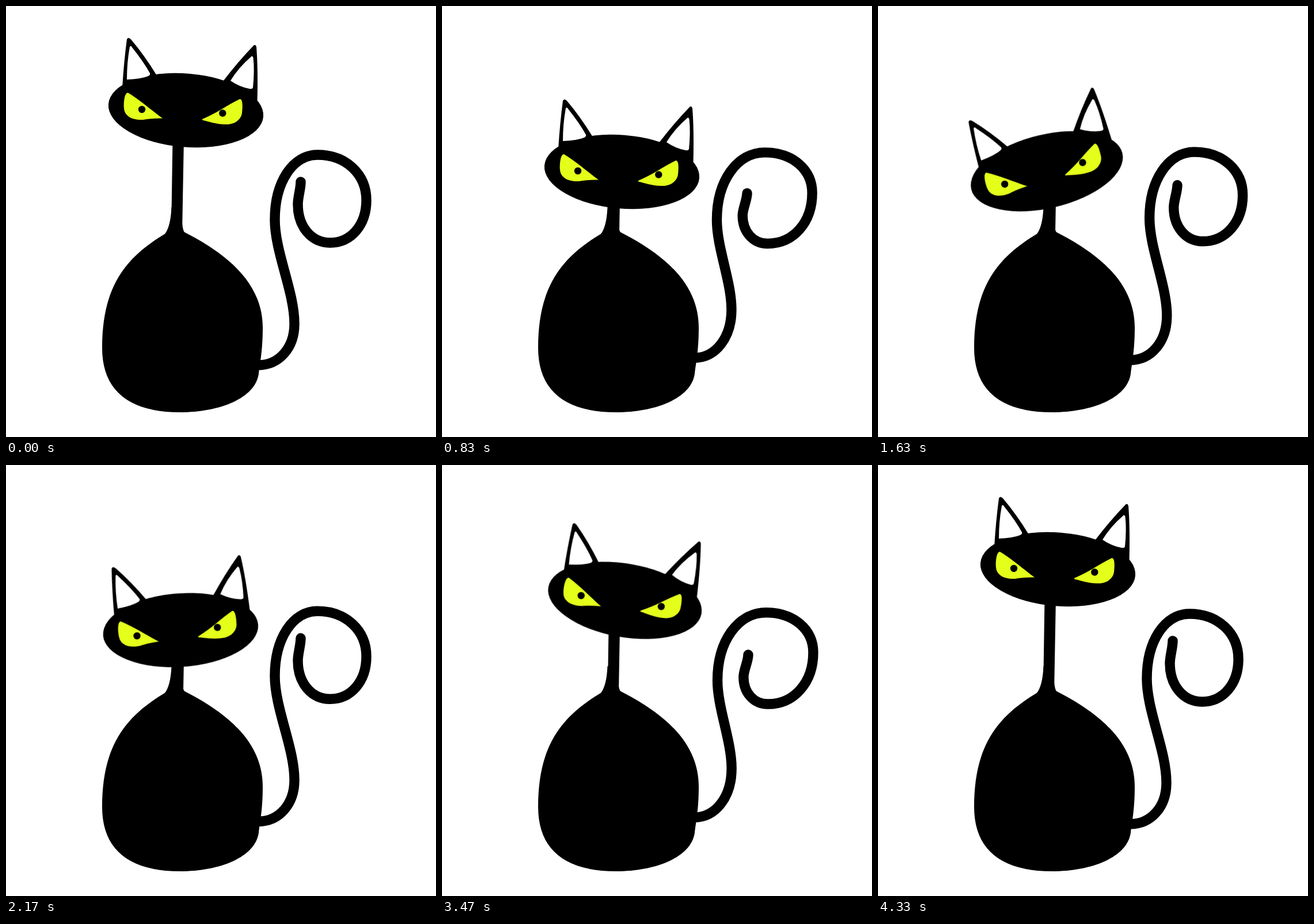
An HTML page for the animation above (4.36 s loop, 747 px wide and 750 px high).

```html
<!DOCTYPE html>
<html lang="en">
<head>
<meta charset="utf-8">
<title>Black cat</title>
<style>
  html, body { margin: 0; width: 100%; height: 100%; overflow: hidden; background: #fff; }
  svg { display: block; width: 100%; height: 100%; }

  .drop, .tilt, .lid { animation: 4360ms cubic-bezier(.333, 0, .667, 1) infinite; }
  .drop { animation-name: drop; }
  .tilt { animation-name: tilt; transform-origin: 300px 241px; }
  .lid { animation-name: squint; fill: #4b4c16; }
  .eye { fill: #e4ff1a; }
  .inner { fill: #fff; }

  @keyframes drop {
    0%, 85.9%, 100% { transform: none; }
    19.1%, 73.2% { transform: translateY(107px); }
  }
  @keyframes tilt {
    0%, 19.1%, 85.9%, 100% { transform: rotate(0deg); }
    27.5%, 42.4% { transform: rotate(-18.2deg); }
    61.5%, 73.2% { transform: rotate(10.4deg); }
  }
  @keyframes squint {
    0%, 62%, 73%, 100% { transform: translateY(-24px); }
    64.9%, 70% { transform: none; }
  }
</style>
</head>
<body>
<svg viewBox="0 0 747 750">
  <defs>
    <path id="eyeL" d="M212 151 C206 150 204 168 205 178 C206 192 220 199 238 198 Q252 195 272 195.5 C252 181 232 163 212 151 Z"/>
    <path id="eyeR" d="M406 162 C412 161 411 178 410 186 C408 200 394 207 381 206 C366 206 352 201 341 198.5 Q340 197 343 196 C365 187 385 172 406 162 Z"/>
    <clipPath id="clipL"><use href="#eyeL"/></clipPath>
    <clipPath id="clipR"><use href="#eyeR"/></clipPath>
  </defs>

  <path id="tail" fill="none" stroke="#000" stroke-width="17.4" stroke-linecap="round"/>

  <!-- body with the flared foot of the neck -->
  <path d="M277 396 C206 438 167 490 167 595 C167 668 212 707 303 707 C370 707 433 683 439 640 C441 622 446 600 446 560 C446 482 385 432 309 393 Z"/>
  <path d="M287.5 350 Q286 385 275 398 L311 395 Q304 388 306 350 Z"/>

  <g class="drop">
    <!-- the neck slides down into the body -->
    <path d="M289.5 231 L287 395 H306 L309 231 Z"/>

    <g class="tilt">
      <ellipse cx="312.5" cy="181.5" rx="135" ry="64" transform="rotate(4.7 312.5 181.5)"/>

      <path d="M210 58 Q212 53 217 58 Q240 85 262 121 L235 145 L202 142 Q205 95 210 58 Z"/>
      <path class="inner" d="M215 71 Q217 68 219 72 Q239 97 250 117 Q251 120 247 122 Q235 127 210 128 Q210 98 215 71 Z"/>
      <path d="M377 131 Q403 97 429 70 Q433 65 435 71 Q438 110 436.5 167 L400 160 Z"/>
      <path class="inner" d="M425 89 Q428 85 429.5 90 Q432 112 429 142 Q428 145 423 144 Q406 141 390 130 Q404 107 425 89 Z"/>

      <use class="eye" href="#eyeL"/>
      <use class="eye" href="#eyeR"/>
      <circle cx="236" cy="180" r="6.2"/>
      <circle cx="376.3" cy="186.5" r="6.2"/>
      <g clip-path="url(#clipL)"><path class="lid" d="M206 146 Q226 184 276 196 V120 H206 Z"/></g>
      <g clip-path="url(#clipR)"><path class="lid" d="M338 198 Q383 194 412 159 V120 H338 Z"/></g>
    </g>
  </g>
</svg>

<script>
  const LOOP = 4360, SWAY = LOOP / 2;
  const tail = document.getElementById('tail');

  // Turning points of the tail: place at rest, shift at full swing, vertical tangent?
  const turns = [
    { x: 438, y: 625, dx: 0, dy: -9, vert: false },
    { x: 501, y: 553, dx: 2, dy: -22, vert: true },
    { x: 467, y: 372, dx: 11, dy: 5, vert: true },
    { x: 541, y: 259, dx: 21, dy: 0, vert: false },
    { x: 626, y: 338, dx: 18, dy: -9, vert: true },
    { x: 563, y: 412, dx: 3, dy: 6, vert: false },
    { x: 507, y: 345, dx: 16, dy: 25, vert: true },
    { x: 512, y: 306, dx: 19, dy: 25, vert: true }
  ];

  // Control point leaving p towards q along p's tangent
  const handle = (p, q) => {
    const k = p.vert === q.vert ? .31 : .58;
    return p.vert ? `${p.x} ${p.y + (q.y - p.y) * k}` : `${p.x + (q.x - p.x) * k} ${p.y}`;
  };

  const smooth = pts => pts.slice(1).reduce((d, q, i) => {
    const p = pts[i];
    return `${d} C${handle(p, q)} ${handle(q, p)} ${q.x} ${q.y}`;
  }, `M${pts[0].x} ${pts[0].y}`);

  // Two sways per loop, quick out and slower back, the second one wider
  function swingAt(t) {
    const reach = t < SWAY ? 1 : 1.25;
    return reach * Math.sin(Math.PI * (t % SWAY / SWAY) ** .88) ** 2;
  }

  const liftAt = t => 5 * Math.sin(Math.PI * (t / LOOP) ** .7);

  function draw(t) {
    const swing = swingAt(t), lift = liftAt(t);
    tail.setAttribute('d', smooth(turns.map(({ x, y, dx, dy, vert }) =>
      ({ x: x + dx * swing, y: y + dy * swing - lift, vert }))));
  }

  const start = performance.now();
  function tick() {
    draw((performance.now() - start) % LOOP);
    requestAnimationFrame(tick);
  }
  tick();
</script>
</body>
</html>
```
